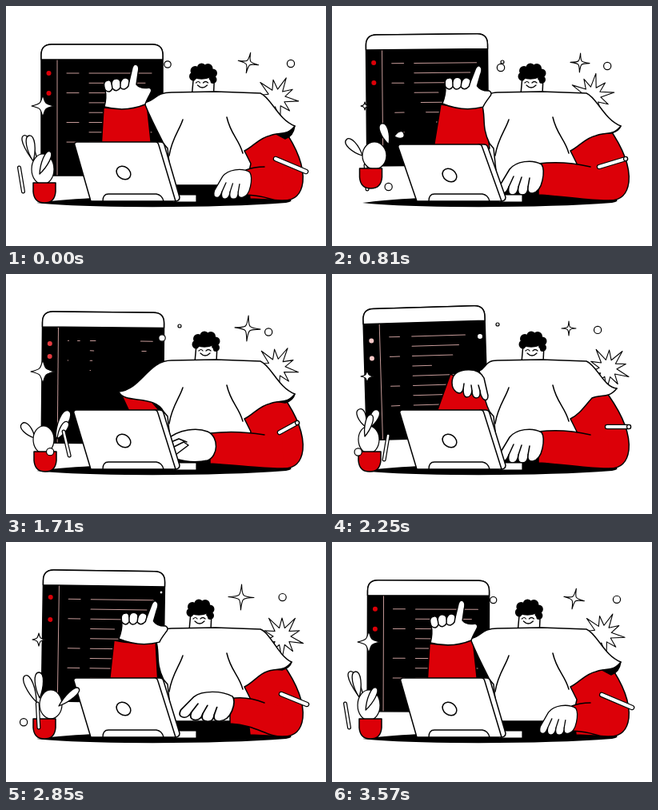
Animation of 400 by 300 pixels, one loop 3600 ms. Source, as an HTML page with a canvas:

```html
<!DOCTYPE html>
<html lang="en">
<head>
<meta charset="utf-8">
<title>Working at a laptop</title>
<style>
html, body { margin: 0; width: 100%; height: 100%; overflow: hidden; background: #fff; }
canvas { display: block; width: 400px; height: 300px; }
</style>
</head>
<body>
<canvas id="stage" width="400" height="300"></canvas>
<script>
const ctx = document.getElementById('stage').getContext('2d');
const LOOP = 3600, STEP = 30, TAU = Math.PI * 2;
const TIMES = [0, 810, 1350, 1710, 2250, 2850];
const RED = '#dc0008', INK = '#000', WHITE = '#fff';
let now = 0;

const clamp = v => Math.max(0, Math.min(1, v));
const rad = d => d * Math.PI / 180;
const wave = (period, shift = 0) => TAU * (now - shift) / period;

// Cyclic cubic interpolation through the values at TIMES.
function key(...v) {
  const n = TIMES.length;
  const at = i => TIMES[(i + n) % n] + LOOP * Math.floor(i / n);
  const val = i => v[(i + n) % n];
  let i = n - 1;
  while (TIMES[i] > now) i--;
  const slope = j => {
    const a = (val(j) - val(j - 1)) / (at(j) - at(j - 1));
    const b = (val(j + 1) - val(j)) / (at(j + 1) - at(j));
    return a * b <= 0 ? 0 : 2 * a * b / (a + b);
  };
  const h = at(i + 1) - at(i), u = (now - at(i)) / h, u2 = u * u, u3 = u2 * u;
  return (2 * u3 - 3 * u2 + 1) * val(i) + (u3 - 2 * u2 + u) * h * slope(i)
    + (3 * u2 - 2 * u3) * val(i + 1) + (u3 - u2) * h * slope(i + 1);
}

function shape(path, fill, width = 1.5) {
  const p = path instanceof Path2D ? path : new Path2D(path);
  if (fill) { ctx.fillStyle = fill; ctx.fill(p); }
  if (width) { ctx.lineWidth = width; ctx.strokeStyle = INK; ctx.stroke(p); }
}

function placed(x, y, angle, draw, sx = 1, sy = 1) {
  ctx.save();
  ctx.translate(x, y);
  ctx.rotate(rad(angle));
  ctx.scale(sx, sy);
  draw();
  ctx.restore();
}

function oval(x, y, rx, ry = rx, fill = WHITE, width = 1.2, angle = 0) {
  const p = new Path2D();
  p.ellipse(x, y, rx, ry, rad(angle), 0, TAU);
  shape(p, fill, width);
}

function bar(x1, y1, x2, y2, w) {
  ctx.lineCap = 'round';
  for (const [color, width] of [[INK, w], [WHITE, w - 2.4]]) {
    ctx.strokeStyle = color;
    ctx.lineWidth = width;
    ctx.beginPath();
    ctx.moveTo(x1, y1);
    ctx.lineTo(x2, y2);
    ctx.stroke();
  }
}

function sparkle(x, y, r, angle, pinch) {
  placed(x, y, angle, () => {
    const q = r * pinch, p = new Path2D();
    p.moveTo(0, -r);
    for (let i = 0; i < 4; i++) {
      const a = i * TAU / 4, c = Math.cos(a), s = Math.sin(a);
      const cx = q * (c + s), cy = q * (s - c);
      p.bezierCurveTo(cx, cy, cx, cy, r * c, r * s);
    }
    shape(p, WHITE, 1.1);
  });
}

function burst(x, y, angle) {
  placed(x, y, angle, () => {
    const p = new Path2D();
    for (let i = 0; i < 20; i++) {
      const r = i % 2 ? 11 : i % 4 ? 23 : 28, a = i * TAU / 20;
      p.lineTo(r * Math.cos(a), r * Math.sin(a));
    }
    p.closePath();
    shape(p, WHITE, 1.1);
  });
}

function codeLine(row, x, length) {
  // The old text wipes away to the right while the new text types in.
  const spans = [
    [clamp((now - 1080 + row * 90) / 780), now < 1860 ? 1 : 0],
    [0, clamp((now - 1650 - row * 15) / 700)]
  ];
  const y = -46 + row * 12.3;
  for (const [from, to] of spans) {
    if (to - from < .02) continue;
    ctx.beginPath();
    ctx.moveTo(x + length * from, y);
    ctx.lineTo(x + length * to, y);
    ctx.stroke();
  }
}

function panel() {
  const sway = -Math.sin(wave(1800));
  const y = 123.5 + 6.5 * Math.cos(wave(1800));
  placed(120 + 3 * sway, y, 1.7 * sway, () => {
    shape('M-76,82V-68Q-76,-82 -63,-82H63Q76,-82 76,-68V82Z', INK);
    shape('M-76,-63V-69Q-76,-82 -63,-82H63Q76,-82 76,-69V-63Z', WHITE);
    ctx.strokeStyle = '#c59a98';
    ctx.lineWidth = 1;
    ctx.beginPath();
    ctx.moveTo(-56, -62);
    ctx.lineTo(-56, 81);
    ctx.stroke();
    for (let row = 0; row < 9; row++) {
      if ([0, 2, 5, 7].includes(row)) codeLine(row, -44, 15);
      codeLine(row, -16, row === 3 ? 30 : 78 - row % 3 * 8);
    }
    const pale = clamp(key(0, 0, 0, .25, .85, 0));
    const dot = `rgb(${220 + 35 * pale},${235 * pale},${8 + 225 * pale})`;
    oval(-66.5, key(-46, -47, -48, -42, -42, -48), 3, 3, dot, 0);
    oval(-66.5, key(-21, -22, -23, -26, -20, -20), 3, 3, dot, 0);
  });
}

function floaters() {
  burst(key(338, 325, 330, 338, 345, 345), key(115, 112, 115, 117, 118, 118), key(8, -8, 0, 12, 22, 18));
  sparkle(key(46, 41, 43, 46, 44, 41), key(125, 125, 120, 122, 128, 122), key(14, 5, 14, 15, 8, 8), 0, .2);
  sparkle(key(303, 310, 307, 302, 296, 294), key(71, 71, 70, 68, 68, 69),
    key(13, 12, 18, 16, 9, 16), key(12, 3, 0, 4, 0, 2), .07);
  oval(342 + 14 * Math.cos(wave(LOOP)), 72 + 3 * Math.sin(wave(LOOP)), 4.6);
  // Two circles swap places over one loop.
  if (now > 400) {
    const back = now > 2850 ? clamp((now - 2850) / 750) : 0;
    oval(back ? 194 + 8 * back : key(203, 213, 220, 217, 207, 194),
      back ? 63 + 10 * back : key(73, 70, 67, 65, 63, 63), 2 + 2.2 * back);
  }
  if (now < 3000) {
    oval(key(202, 211, 203, 195, 185, 185), key(73, 77, 80, 80, 78, 75), key(4.2, 4.7, 4.6, 4.2, 3.6, 2));
  }
}

function leaf(x1, y1, x2, y2, w) {
  const a = Math.atan2(y2 - y1, x2 - x1) * 180 / Math.PI, l = Math.hypot(x2 - x1, y2 - y1);
  placed(x1, y1, a, () =>
    shape(`M0,0C${l * .4},${-w} ${l},${-w * 1.3} ${l},0C${l},${w * 1.3} ${l * .4},${w} 0,0Z`, WHITE, 1.3));
}

function orbitBar() {
  const x = 47.5 - 28.5 * Math.cos(wave(LOOP));
  const y = key(217, 214, 208, 212, 217, 217);
  const lean = key(2.5, 1, 1.5, 3.5, -2.5, .8);
  bar(x - lean, y - 15, x + lean, y + 15, 5);
}

function orbitBall() {
  const a = wave(LOOP, 1000);
  oval(47 + 25 * Math.cos(a), 225 - 3 * Math.sin(a), 4.6);
}

function plant() {
  const barInFront = now > 1200, ballInFront = now > 1000 && now < 2850;
  if (!barInFront) orbitBar();
  if (!ballInFront) orbitBall();
  leaf(key(40, 38, 33, 36, 42, 38), key(200, 187, 200, 205, 191, 200),
    key(22, 18, 3, 20, 34, 24), key(162, 167, 192, 187, 169, 167), 6);
  leaf(key(34, 71, 64, 62, 46, 42), key(194, 173, 187, 206, 193, 195),
    key(29, 62, 84, 78, 57, 41), key(162, 147, 164, 171, 170, 163), key(6, 6, 8, 7, 6, 6));
  oval(key(46, 53, 47, 47, 46, 56), key(204, 187, 197, 207, 207, 203), key(14, 15, 15, 13, 13, 14), key(19, 17, 17, 17, 17, 18));
  leaf(key(42, 78, 80, 64, 41, 66), key(210, 163, 179, 206, 203, 205),
    key(55, 90, 95, 77, 49, 91), key(182, 160, 174, 185, 176, 183), 5);
  placed(key(48, 48.5, 47.5, 49, 47, 48), key(221, 203, 210, 222, 222, 221), 0, () =>
    shape('M-14,0H14V11Q13,25 0,25Q-13,25 -14,11Z', RED));
  if (barInFront) orbitBar();
  if (ballInFront) orbitBall();
}

function head() {
  placed(key(-3.5, 0, 2, 0, 1, -7), 0, 0, () => {
    shape('M238,88L236,110H263L264,88Z', WHITE);
    const curls = [[238, 88, 5.5], [240, 81, 6], [248, 77, 5.5], [256, 78, 6], [262, 84, 5.5], [262, 92, 5], [250, 84, 8]];
    for (const [x, y, r] of curls) oval(x, y, r, r, INK, 0);
    oval(249, 96, 10.5, 7.5, WHITE, 0);
    shape('M239,90Q249,94 260,89L262,82H238Z', INK, 0);
    shape('M241,96Q244,93 246,96M250,96Q253,93 256,96M243,99Q249,105 255,99', null, 1.2);
  });
}

function upperArm() {
  shape('M298,180L335,140L346,152C362,175 373,200 371,220C369,236 361,243 347,243L305,241Z', RED);
}

function forearm() {
  const wx = key(300, 258, 258, 255, 258, 280), top = key(205, 197, 197, 199, 197, 196);
  const low = key(236, 236, 236, 237, 236, 227);
  const under = `M347,243C325,244 ${wx + 35},${low + 2} ${wx},${low}L${wx},${top}Q${(wx + 320) / 2},${top - 4} 323,201`;
  shape(`${under}L345,205Z`, RED, 0);
  shape(under, null);
}

function armBand() {
  const x1 = key(337, 334, 340, 342, 344, 344), y1 = key(191, 201, 201, 198, 191, 190);
  const x2 = key(375, 367, 363, 364, 371, 376), y2 = key(207, 191, 187, 186, 191, 203);
  bar(x1, y1, x2, y2, 6.5);
  if (now > 700 && now < 2500) oval(x2, y2, 2.5);
}

function rightHand() {
  if (now > 1080 && now < 1980) {
    placed(258, 196, 0, () => {
      shape('M-58,12C-42,-3 -18,-4 -6,1C9,8 7,32 -6,37C-20,40 -36,38 -46,35L-58,28Z', WHITE);
      shape('M-54,15L-42,10L-32,14M-50,21L-36,14L-30,18L-46,30', null);
    });
    return;
  }
  placed(key(303, 260, 261, 259, 260, 281), key(206, 196, 195, 197, 196, 191), key(0, 0, 0, 0, 0, 6), () => {
    shape(`M2,2C-10,-5 -30,-2 -38,8L-50,28Q-53,38 -46,38Q-42,38 -39,30Q-41,40 -34,40Q-28,39 -27,30
      Q-29,40 -22,40Q-15,40 -15,30Q-16,39 -9,38Q0,36 3,22Q6,8 2,2Z`, WHITE);
    shape('M-39,30L-33,17M-27,30L-23,18M-15,30L-13,19', null);
  }, key(.85, 1, 1, 1, 1, 1.2), key(.88, 1, 1, 1, 1, .9));
}

function leftArm() {
  const ax = key(122, 136, 148, 143, 148, 135), ay = key(127, 123, 128, 148, 125, 123);
  const bx = key(176, 190, 190, 178, 195, 187), by = key(122, 122, 150, 155, 140, 123);
  const cx = key(119, 127, 136, 157, 129, 129), dx = key(182, 197, 190, 198, 197, 190);
  shape(`M${ax},${ay}Q${(ax + bx) / 2},${(ay + by) / 2 + 6} ${bx},${by}L${dx},178H${cx}Z`, RED);
}

function leftHand() {
  const x = key(150, 168, 172, 160, 172, 171), y = key(102, 102, 134, 195, 136, 101);
  placed(x, y, key(0, 8, 0, 0, 0, 8), () => {
    if (now > 1220 && now < 2520) {
      if (now < 1500) shape('M18,3L23,-32Q25,-40 30,-36L31,-14Q29,8 21,12Z', WHITE);
      shape(`M-22,0Q-22,-14 -6,-16Q12,-18 18,-6L23,16Q23,23 18,21Q14,18 13,10Q14,19 8,19Q3,18 3,10
        Q2,18 -4,18Q-8,17 -8,8Q-10,15 -16,12Q-22,8 -22,0Z`, WHITE);
      shape('M13,10L11,3M3,10L2,3M-8,8L-7,1', null);
      return;
    }
    shape(`M-27,24Q-24,12 -26,3Q-30,-8 -23,-9Q-19,-10 -18,-5Q-17,-12 -11,-11Q-7,-10 -7,-6
      Q-5,-13 0,-12Q4,-11 4,-8L8,-25Q10,-31 14,-28Q17,-26 15,-18L13,-4Q18,2 29,0Q34,2 30,8
      Q25,17 24,21Q0,31 -27,24Z`, WHITE);
    shape('M-26,3Q-20,8 -17,1Q-12,7 -7,0Q-2,5 3,-2M-18,-5L-17,1M-7,-6V0M4,-8L3,-2', null);
  });
}

function shirt() {
  const lx = key(173, 187, 188, 141, 184, 187), ly = key(121, 122, 123, 147, 121, 122);
  const rx = key(361, 361, 357, 361, 356, 357), ry = key(150, 150, 142, 150, 143, 150);
  const under = key(13, 6, 0, 8, 0, 7);
  shape(`M${rx},${ry}Q${rx - 2},${ry + under} ${rx - 12},${ry + under + 3}L${rx - 25},${ry + 9}Z`, INK);
  shape(`M${lx},${ly}C${lx * .55 + 92},${ly - 3} ${lx * .3 + 135},108 207,108L262,107L318,109
    C331,114 340,142 ${rx},${ry}C${rx - 10},${ry + 13} ${rx - 20},${ry + 7} ${rx - 31},${ry + 12}
    C316,165 309,176 298,181L306,197L300,224H207L202,178L197,172
    C186,150 ${lx + 6},${ly + 16} ${lx},${ly}Z`, WHITE);
  shape('M221,142C217,155 207,166 204,187M276,139C281,161 291,166 296,184', null);
}

function laptop() {
  const x = key(86, 83, 87, 85, 85, 85), y = key(170, 173, 168, 170, 170, 170);
  const right = y + key(0, 0, -2.5, 0, 0, 0);
  shape('M208,236H238V245H208Z', WHITE, 1.2);
  shape(`M${x + 100},${right}H${x + 107}Q${x + 111},${right} ${x + 112},${right + 4}L217,239Q217,244 211,244Z`, WHITE);
  shape(`M${x + 3},${y}L${x + 101},${right}Q${x + 104},${right} ${x + 105},${right + 4}L212,244H106
    L${x},${y + 4}Q${x - 1},${y} ${x + 3},${y}Z`, WHITE);
  shape('M121,244Q121,235 128,235H188Q195,236 197,244Z', WHITE, 1.3);
  oval(147, y + 38.5, 9.5, 7.5, WHITE, 1.5, 35);
}

function draw() {
  ctx.fillStyle = WHITE;
  ctx.fillRect(0, 0, 400, 300);
  ctx.lineJoin = ctx.lineCap = 'round';
  panel();
  floaters();
  shape('M38,246Q90,239 215,236H330Q370,242 350,246Q270,252 150,251Q70,250 38,246Z', INK, 0);
  shape('M213,222H305L345,246H215Z', INK, 0);
  head();
  upperArm();
  leftArm();
  shirt();
  forearm();
  armBand();
  rightHand();
  leftHand();
  laptop();
  plant();
}

function tick() {
  now = Math.floor(performance.now() % LOOP / STEP) * STEP;
  draw();
  requestAnimationFrame(tick);
}
tick();
</script>
</body>
</html>
```
